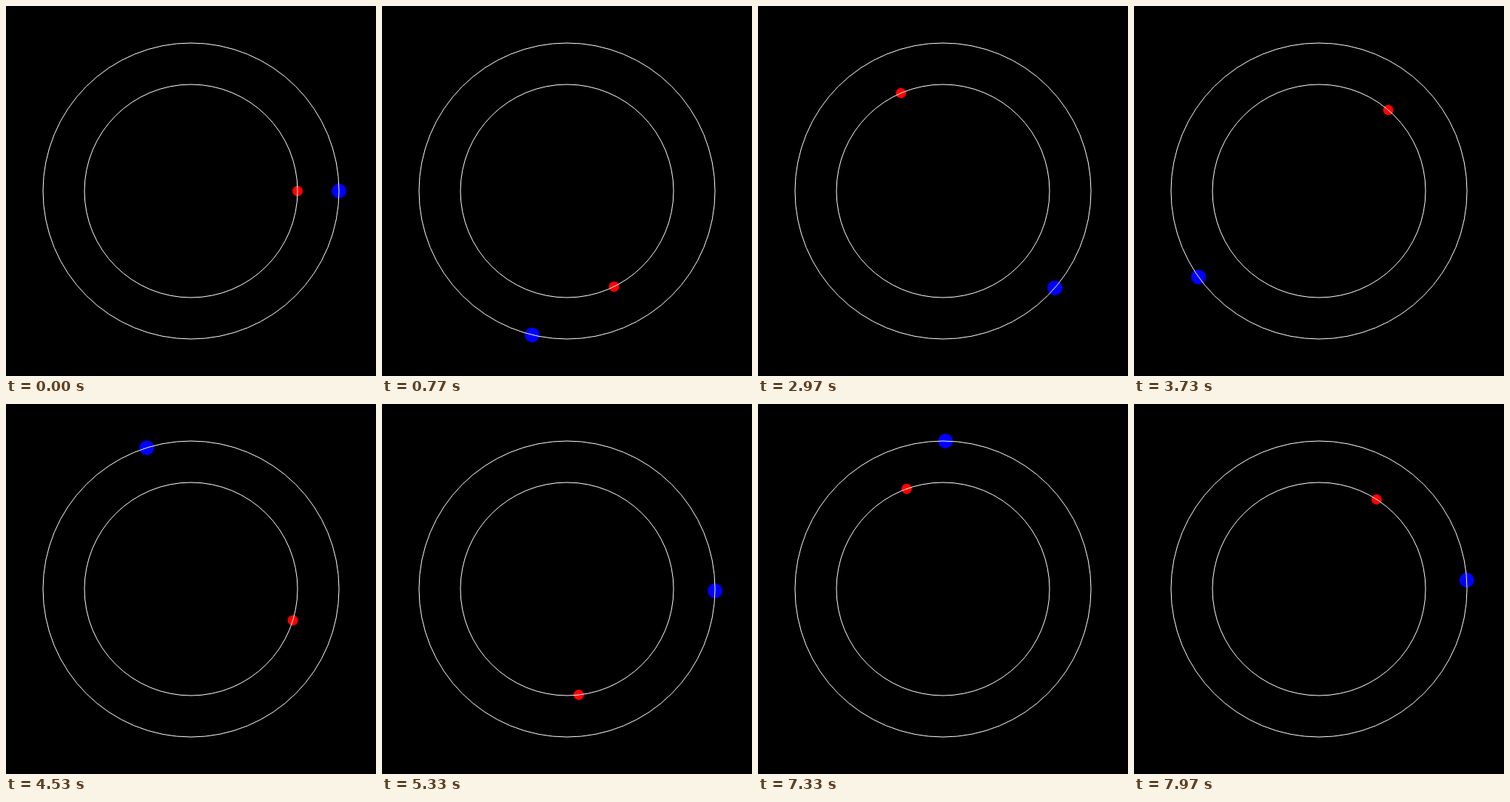
Write an HTML page that moves like this. It is 500x500 px and loops after 8 s.

```html
<!DOCTYPE html>
<html lang="en">
<head>
<meta charset="utf-8">
<title>Two orbits</title>
<style>
  html, body { margin: 0; width: 100%; height: 100%; overflow: hidden; background: #000; }
  svg { display: block; width: 100vw; height: 100vh; }
  .orbit { fill: none; stroke: #fff; stroke-width: 1; }
</style>
</head>
<body>
<svg viewBox="0 0 500 500">
  <circle id="outer" r="10" fill="#00f"/>
  <circle id="inner" r="7" fill="#f00"/>
  <circle class="orbit" cx="250" cy="250" r="200"/>
  <circle class="orbit" cx="250" cy="250" r="144"/>
</svg>
<script>
  const LOOP = 8000;
  const CENTER = 250;
  const OUTER_STEP = 4.5044;                     // degrees per step
  const INNER_STEP = OUTER_STEP * 224.7 / 365;
  const bodies = [
    { dot: document.getElementById('outer'), radius: 200, step: OUTER_STEP },
    { dot: document.getElementById('inner'), radius: 144, step: INNER_STEP }
  ];

  // 30 steps per second, with switch times rounded to 10 ms
  const stepAt = ms => Math.floor((Math.floor(ms / 10) * 10 + 5) * 0.03);

  function draw(ms) {
    const n = stepAt(ms % LOOP);
    for (const { dot, radius, step } of bodies) {
      const angle = n * step * Math.PI / 180;
      dot.setAttribute('cx', CENTER + radius * Math.cos(angle));
      dot.setAttribute('cy', CENTER + radius * Math.sin(angle));
    }
  }

  const start = performance.now();
  function tick() {
    draw(performance.now() - start);
    requestAnimationFrame(tick);
  }
  tick();
</script>
</body>
</html>
```
